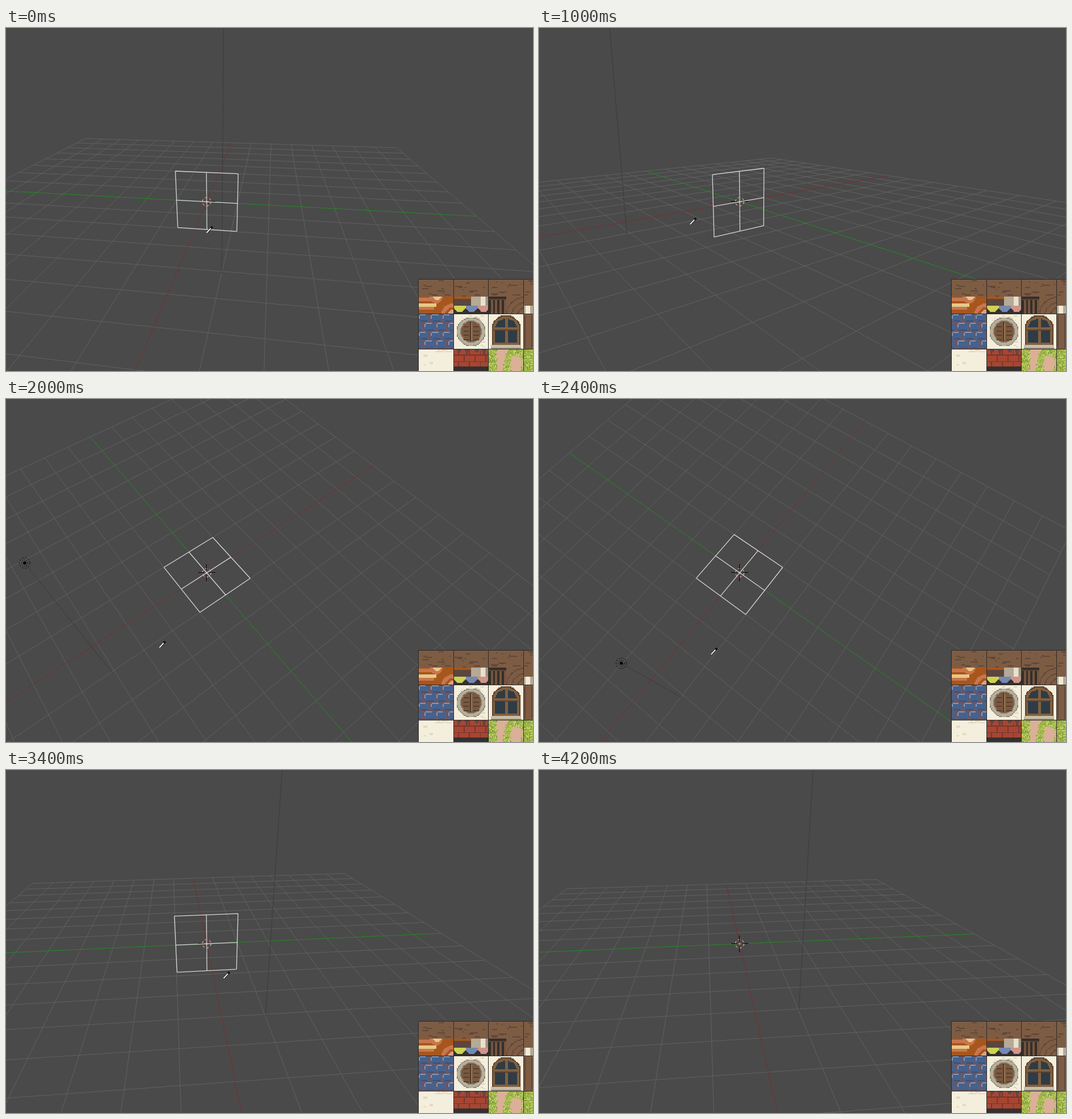
Write an HTML page with a canvas that moves like this. It is 927 px wide and 604 px high and loops after 5000 ms.

```html
<!DOCTYPE html>
<html lang="en">
<head>
<meta charset="utf-8">
<title>Viewport orbit</title>
<style>
html, body { margin: 0; width: 100%; height: 100%; overflow: hidden; background: #4a4a4a; }
canvas { display: block; }
</style>
</head>
<body>
<canvas id="stage" width="927" height="604"></canvas>
<script>
const ctx = document.getElementById('stage').getContext('2d');
const STEP = 200, LOOP = 5000;
const FOCAL = 674, DIST = 12.42, ROLL = 0.01, CX = 353, CY = 306;
const LAMP = { g: 1.005, w: -4.076, z: 5.904 };

// One row per step: azimuth, elevation, pointer x, pointer y
const POSES = [
  [9.45, 22.5, 358, 355], [19, 16.2, 340, 345], [30, 15.4, 318, 344],
  [40.35, 15.6, 298, 343], [48, 14.9, 284, 342], [55, 13.7, 271, 340],
  [58.7, 13.9, 264, 342], [58.7, 13.9, 264, 341], [60.2, 28.9, 262, 373],
  [59, 49, 264, 411], [54, 60, 275, 432], [46, 66, 291, 443],
  [37.9, 67.5, 308, 444], [16, 66, 349, 441], [6.05, 62.5, 368.5, 428],
  [-1, 56, 382, 413], [-4, 29.4, 387, 371], [-4.7, 25, 388, 361],
  [-4.7, 22.85, 390, 394], [-4.7, 22.85, 400, 357], [-4.7, 22.85, 226, 549],
  [-4.7, 22.85]
];
const SQUARE_GONE = 19;

/* ---- tile sheet, drawn once in texels ---- */
function makeSheet() {
  const sheet = document.createElement('canvas');
  sheet.width = 105;
  sheet.height = 85;
  const c = sheet.getContext('2d');
  let seed = 7;
  const rnd = () => (seed = (seed * 16807) % 2147483647) / 2147483647;
  const rect = (color, x, y, w, h) => {
    c.fillStyle = color;
    c.fillRect(x, y, w, h);
  };
  const clipTo = (x, y, w, h, draw) => {
    c.save();
    c.beginPath();
    c.rect(x, y, w, h);
    c.clip();
    draw();
    c.restore();
  };
  const disc = (color, cx, cy, r) => {
    for (let y = Math.floor(cy - r); y <= cy + r; y++) {
      const half = Math.sqrt(Math.max(0, r * r - (y + 0.5 - cy) ** 2));
      const x = Math.round(cx - half), w = Math.round(cx + half) - x;
      if (w > 0) rect(color, x, y, w, 1);
    }
  };
  const specks = (color, n, x, y, w, h, len) => {
    for (let i = 0; i < n; i++) {
      const l = 1 + Math.floor(rnd() * len);
      rect(color, x + Math.floor(rnd() * (w - l)), y + Math.floor(rnd() * h), l, 1);
    }
  };

  // planks
  rect('#7d5c44', 0, 0, 105, 32);
  for (let x = 0; x < 96; x += 32) specks('#614738', 12, x, 1, 32, 15, 7);
  specks('#614738', 5, 97, 1, 8, 15, 5);

  // orange roof
  clipTo(0, 16, 32, 16, () => {
    rect('#a7561c', 0, 16, 32, 16);
    rect('#c87650', 0, 17, 15, 5);
    rect('#a7561c', 0, 20, 14, 2);
    rect('#e8c886', 0, 22, 16, 3);
    rect('#c87650', 0, 25, 14, 3);
    disc('#c87650', 16, 16, 6);
    disc('#e8c886', 17, 15, 4);
    disc('#c87650', 31, 32, 10);
    disc('#a7561c', 31, 33, 7);
    disc('#d9a184', 31, 32, 4);
  });

  // awning
  rect('#a7561c', 32, 16, 16, 2);
  rect('#5a463f', 32, 18, 16, 6);
  rect('#b4aa96', 48, 16, 16, 8);
  rect('#e9e1cc', 57, 16, 4, 8);
  rect('#918778', 62, 16, 1, 8);
  rect('#33302e', 32, 24, 32, 8);
  clipTo(32, 24, 32, 8, () => {
    ['#cfd153', '#7688b3', '#d09488'].forEach((color, i) => {
      rect(color, 32 + i * 11, 24, 11, 2);
      disc(color, 37.5 + i * 11, 25, 5.3);
    });
  });

  // railing and arch
  rect('#352e29', 64, 16, 16, 16);
  for (let x = 66; x < 80; x += 4) rect('#745540', x, 19, 2, 13);
  rect('#5b4434', 64, 18, 16, 1);
  clipTo(80, 16, 16, 16, () => {
    for (let r = 17; r > 3; r -= 5) {
      disc('#614738', 97, 33, r);
      disc('#7d5c44', 97, 33, r - 1);
    }
  });
  rect('#b4aa96', 96, 24, 9, 8);
  rect('#f2ead8', 98, 24, 4, 8);

  // blue stones
  rect('#6b5663', 0, 32, 32, 32);
  clipTo(0, 32, 32, 32, () => {
    for (let row = 0; row < 4; row++) {
      for (let i = -1; i < 4; i++) {
        const x = i * 11 + (row % 2) * 5, y = 32 + row * 8, w = 9 + (i + row) % 2;
        rect('#45628f', x + 1, y, w - 2, 7);
        rect('#45628f', x, y + 1, w, 5);
        rect('#8797b3', x + 1, y, w - 4, 1);
        rect('#8797b3', x, y + 1, 1, 3);
        rect('#385178', x + 2, y + 6, w - 3, 1);
      }
    }
  });

  // round window
  rect('#f4eedd', 32, 32, 64, 32);
  specks('#ded3b8', 9, 33, 33, 30, 5, 4);
  specks('#ded3b8', 9, 54, 54, 9, 9, 3);
  disc('#8f897e', 48, 48, 13.4);
  disc('#b8af99', 48, 48, 12.6);
  disc('#857d72', 48, 48, 10);
  disc('#79593f', 48, 48, 9.3);
  rect('#4c392e', 47, 39, 1, 18);
  rect('#9a7553', 48, 40, 1, 16);
  for (let y = 43; y < 56; y += 4) {
    rect('#573f30', 41, y, 5, 1);
    rect('#573f30', 50, y, 5, 1);
  }

  // arched window
  disc('#5c412f', 80, 46, 13.4);
  rect('#5c412f', 67, 46, 26, 15);
  disc('#80603f', 80, 46, 12.3);
  rect('#80603f', 68, 46, 24, 14);
  disc('#2f3b45', 80, 46, 10);
  rect('#2f3b45', 70, 46, 20, 12);
  rect('#80603f', 79, 35, 3, 24);
  rect('#80603f', 69, 44, 22, 2);
  rect('#5c412f', 69, 46, 22, 1);
  rect('#c8bea6', 66, 60, 28, 3);
  rect('#988f7e', 66, 63, 28, 1);

  // door edge
  rect('#7d5c44', 96, 32, 9, 32);
  rect('#604637', 97, 33, 1, 30);
  rect('#604637', 103, 33, 1, 30);

  // plaster
  rect('#f4eedd', 0, 64, 32, 21);
  specks('#e6dac0', 12, 15, 64, 17, 3, 4);
  rect('#e6dac0', 4, 69, 4, 2);
  rect('#e6dac0', 10, 76, 3, 2);
  rect('#e6dac0', 4, 78, 3, 1);

  // red bricks
  rect('#a64632', 32, 64, 32, 21);
  for (let row = 0; row < 3; row++) {
    rect('#7c342d', 32, 69 + row * 6, 32, 1);
    for (let x = 36 + (row % 2) * 5; x < 64; x += 10) rect('#7c342d', x, 64 + row * 6, 1, 5);
  }
  [35, 42, 51, 58].forEach((x, i) => {
    rect('#5b4644', x, 64, 4, 2);
    rect('#5b4644', x + 1, 66, 2, 1 + i % 2 * 2);
  });
  rect('#35302f', 32, 80, 32, 5);

  // grass and path
  for (let y = 64; y < 85; y++) {
    for (let x = 64; x < 105; x++) {
      const edge = rnd() * 2;
      const left = Math.abs(x - 76 + (y - 64) * 0.12) < 5.5 - (y - 64) * 0.08 - edge;
      const right = Math.hypot(x - 89, (y - 77) * 0.75) < 7 - edge;
      const n = rnd();
      const grass = n < 0.22 ? '#c5d265' : n < 0.4 ? '#7e9a3c' : '#9bb548';
      rect((left || right) && x < 96 ? '#dab096' : grass, x, y, 1, 1);
    }
  }
  return sheet;
}
const sheet = makeSheet();

function drawSheet() {
  ctx.imageSmoothingEnabled = false;
  ctx.drawImage(sheet, 726, 442.5, 105 * 1.92, 85 * 1.92);
  ctx.fillStyle = '#2b2926';
  for (const x of [725, 787, 848, 910]) ctx.fillRect(x, 442, 1, 162);
  for (const y of [442, 503, 565]) ctx.fillRect(725, y, 202, 1);
}

/* ---- viewport ---- */
function camera(azimuth, elevation) {
  const a = azimuth * Math.PI / 180, e = elevation * Math.PI / 180;
  const ca = Math.cos(a), sa = Math.sin(a), ce = Math.cos(e), se = Math.sin(e);
  const project = (g, w, z = 0) => {
    const away = w * ca - g * sa;
    const k = FOCAL / (DIST + away * ce - z * se);
    const x = (g * ca + w * sa) * k, y = -(away * se + z * ce) * k;
    return [CX + x + ROLL * y, CY + y - ROLL * x];
  };
  // Ground or wall, whichever faces the viewer most
  let plane = (u, v) => [u, v, 0];
  if (se < ce * Math.max(Math.abs(ca), Math.abs(sa))) {
    plane = Math.abs(ca) > Math.abs(sa) ? (u, v) => [u, 0, v] : (u, v) => [0, u, v];
  }
  return { project, plane };
}

function line(p, q) {
  ctx.moveTo(...p);
  ctx.lineTo(...q);
}

function stroke(color, width, build) {
  ctx.strokeStyle = color;
  ctx.lineWidth = width;
  ctx.beginPath();
  build();
  ctx.stroke();
}

function ring(x, y, r, color, dash, offset = 0) {
  ctx.setLineDash(dash);
  ctx.lineDashOffset = offset;
  stroke(color, 1, () => ctx.arc(x, y, r, 0, 7));
  ctx.setLineDash([]);
}

function dot(x, y, r, color) {
  ctx.fillStyle = color;
  ctx.beginPath();
  ctx.arc(x, y, r, 0, 7);
  ctx.fill();
}

function drawGrid(project) {
  stroke('#616161', 1, () => {
    for (let i = -8; i <= 8; i++) {
      if (!i) continue;
      line(project(i, -8), project(i, 8));
      line(project(-8, i), project(8, i));
    }
  });
  stroke('#7d2c2c', 1, () => line(project(0, -8), project(0, 8)));
  stroke('#248a24', 1, () => line(project(-8, 0), project(8, 0)));
}

function drawLamp(project) {
  const top = project(LAMP.g, LAMP.w, LAMP.z);
  stroke('#3b3b3b', 1, () => line(top, project(LAMP.g, LAMP.w)));
  dot(...top, 2.7, '#000');
  ring(...top, 5.5, '#111', [2, 2]);
  ring(...top, 9.3, '#111', [3, 2.5]);
}

function drawCross() {
  ring(CX, CY, 7.5, '#e8e8e8', [4, 4]);
  ring(CX, CY, 7.5, '#c03030', [4, 4], 4);
  stroke('#000', 1, () => {
    for (const s of [-1, 1]) {
      line([CX + 5 * s, CY - 0.5], [CX + 15 * s, CY - 0.5]);
      line([CX - 0.5, CY + 5 * s], [CX - 0.5, CY + 15 * s]);
    }
  });
  dot(CX, CY, 1.6, '#e0a060');
}

function drawSquare({ project, plane }) {
  const at = (u, v) => project(...plane(u, v));
  stroke('#d6d6d6', 1.3, () => {
    for (const i of [-1, 0, 1]) {
      line(at(i, -1), at(i, 1));
      line(at(-1, i), at(1, i));
    }
  });
}

function drawPointer(x, y) {
  ctx.lineCap = 'round';
  stroke('#111', 3.6, () => line([x - 3.5, y + 4], [x + 3, y - 3]));
  stroke('#eee', 1.9, () => line([x - 4.5, y + 5], [x + 2, y - 2]));
  ctx.lineCap = 'butt';
  dot(x + 4, y - 4, 2.1, '#111');
}

function draw(step) {
  const [azimuth, elevation, px, py] = POSES[step];
  const view = camera(azimuth, elevation);
  ctx.fillStyle = '#4a4a4a';
  ctx.fillRect(0, 0, 927, 604);
  drawGrid(view.project);
  drawLamp(view.project);
  drawCross();
  if (step < SQUARE_GONE) drawSquare(view);
  drawSheet();
  if (px !== undefined) drawPointer(px, py);
}

const start = performance.now();
let shown = -1;
function tick() {
  const time = Math.max(0, performance.now() - start) % LOOP;
  const step = Math.min(Math.floor(time / STEP), POSES.length - 1);
  if (step !== shown) draw(shown = step);
  requestAnimationFrame(tick);
}
tick();
</script>
</body>
</html>
```
